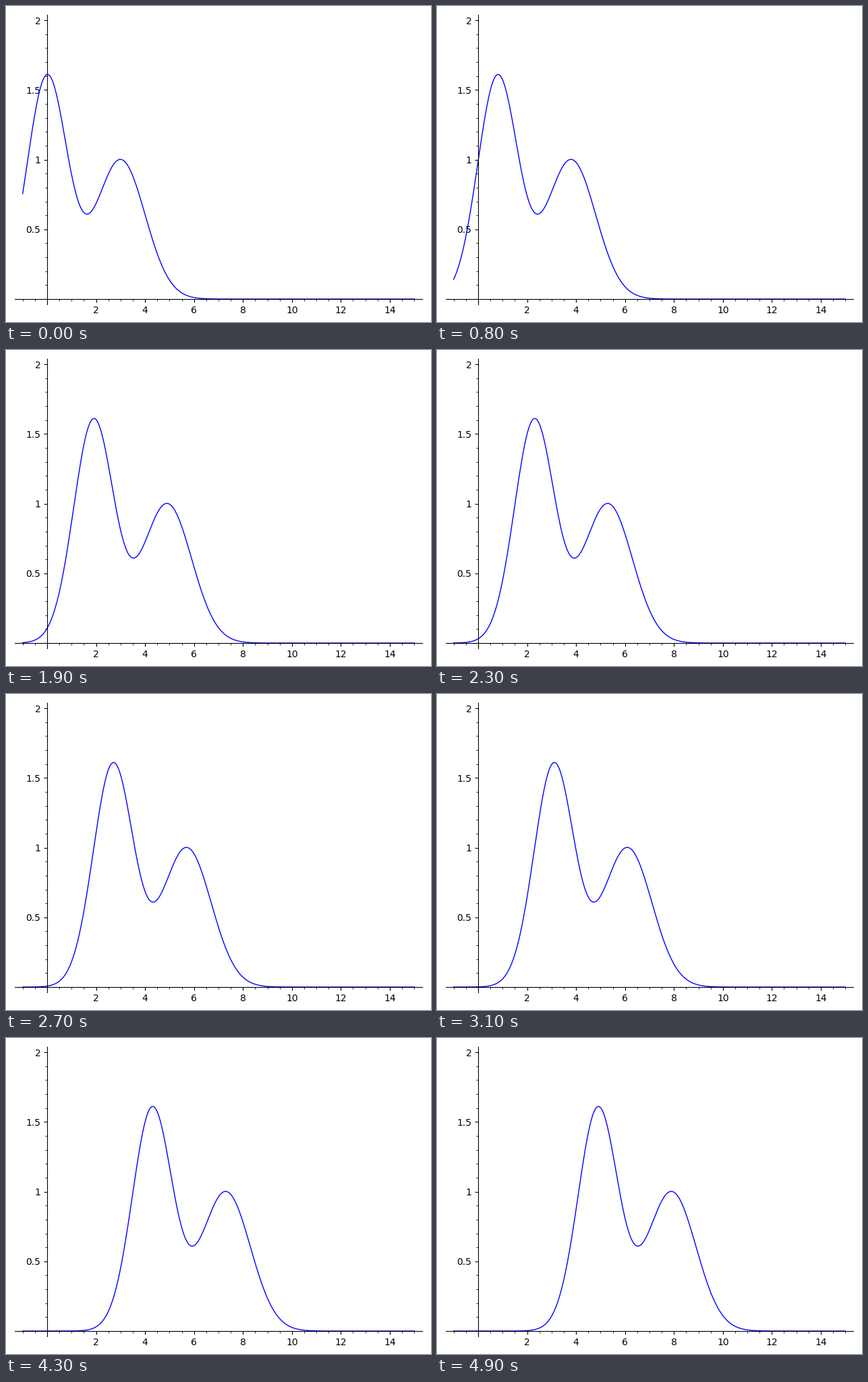
A matplotlib script for the animation above (5 s loop, 630x468 px).

```python
import matplotlib.pyplot as plt
import numpy as np
from matplotlib.animation import FuncAnimation
from matplotlib.ticker import AutoMinorLocator, FuncFormatter, MultipleLocator

WIDTH, HEIGHT, DPI = 630, 468, 100
FRAMES, INTERVAL = 50, 100
SPEED = 0.1  # x units per frame
X_RANGE, Y_RANGE = (-1, 15), (0, 2)
MARGIN = 0.02

# Pixel edges of the plot area, measured from the top left
LEFT, RIGHT, TOP = 13.1, 616.8, 12.9
ZERO_Y = 434.0


def wave(x):
    return 1.6 * np.exp(-0.75 * x**2) + np.exp(-((x - 3) ** 2) / 2)


def padded(low, high):
    pad = MARGIN * (high - low)
    return low - pad, high + pad


def style_axis(axis, step, divisions):
    axis.set_major_locator(MultipleLocator(step))
    axis.set_minor_locator(AutoMinorLocator(divisions))
    axis.set_major_formatter(
        FuncFormatter(lambda value, _: "" if abs(value) < 1e-9 else f"{value:g}")
    )


plt.rcParams.update({"font.family": "DejaVu Sans", "font.size": 10})
fig = plt.figure(figsize=(WIDTH / DPI, HEIGHT / DPI), dpi=DPI, facecolor="white")

y_low, y_high = padded(*Y_RANGE)
bottom = TOP + (ZERO_Y - TOP) * (y_high - y_low) / y_high
ax = fig.add_axes([
    LEFT / WIDTH,
    1 - bottom / HEIGHT,
    (RIGHT - LEFT) / WIDTH,
    (bottom - TOP) / HEIGHT,
])
ax.set(xlim=padded(*X_RANGE), ylim=(y_low, y_high))
for side in ("left", "bottom"):
    ax.spines[side].set_position(("data", 0))
for side in ("right", "top"):
    ax.spines[side].set_visible(False)
style_axis(ax.xaxis, 2, 4)
style_axis(ax.yaxis, 0.5, 5)

xs = np.linspace(*X_RANGE, 801)
curve, = ax.plot(xs, wave(xs), color="blue", linewidth=1)


def update(frame):
    curve.set_ydata(wave(xs - SPEED * frame))
    return (curve,)


animation = FuncAnimation(
    fig, update, frames=FRAMES, interval=INTERVAL, repeat=True, repeat_delay=0
)
plt.show()
```
